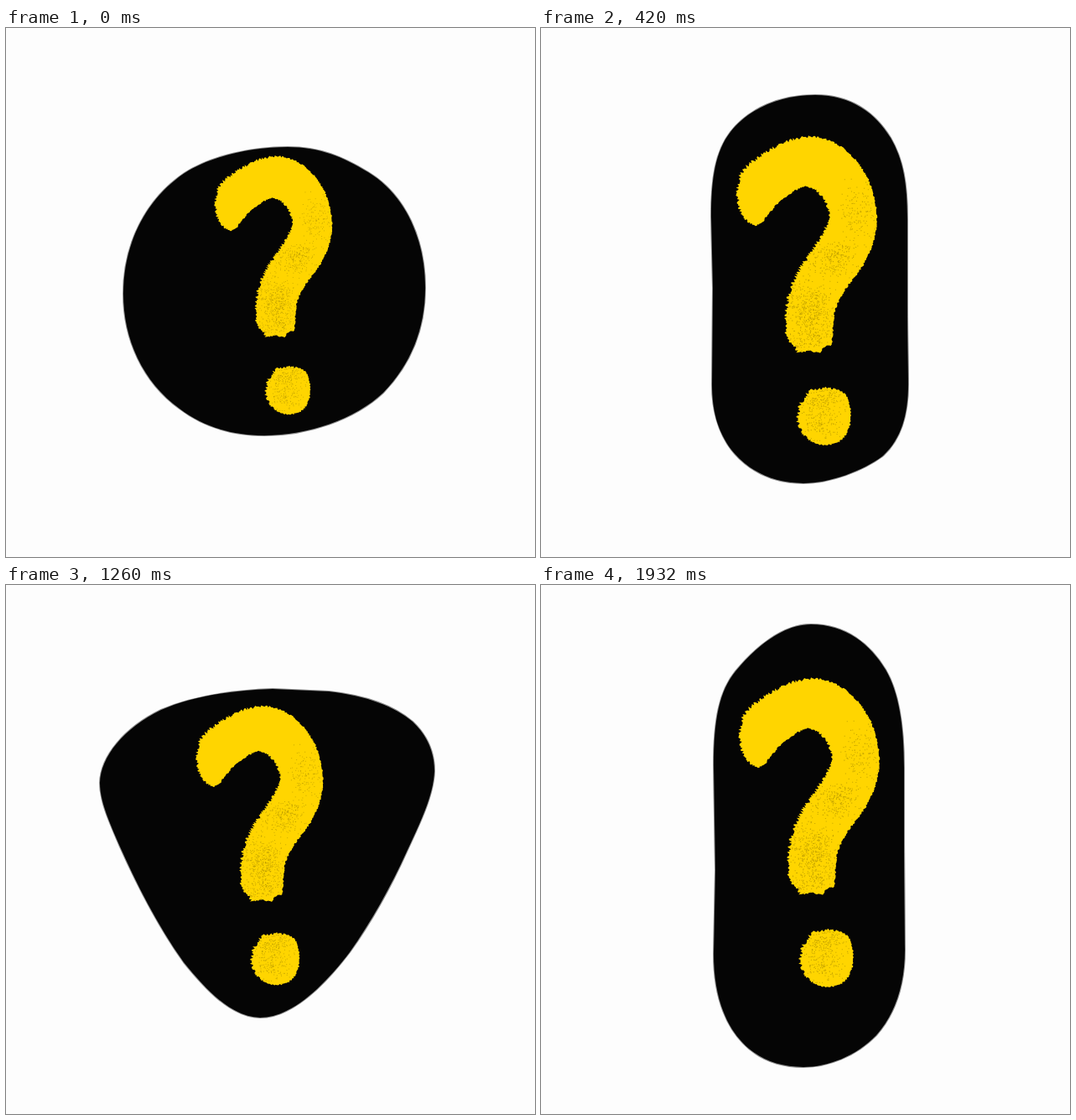
These frames come from a looping animation (631x631 px, 2100 ms). An HTML page:

```html
<!DOCTYPE html>
<html lang="en">
<head>
<meta charset="utf-8">
<title>Question mark shapes</title>
<style>
  html, body { margin: 0; width: 100%; height: 100%; overflow: hidden; background: #fdfdfd; }
  svg { display: block; width: 100%; height: 100%; }
</style>
</head>
<body>
<svg viewBox="0 0 631 631">
  <clipPath id="inside"><path id="clipShape"/></clipPath>
  <path id="blob" fill="#050505" stroke="#050505" stroke-opacity=".45" stroke-width="2"/>
  <g id="mark">
    <path id="paint" fill="#ffd500"/>
    <path id="grain" clip-path="url(#inside)" stroke="#a98d00" stroke-opacity=".65" stroke-width=".9"/>
  </g>
</svg>
<script>
const HOLD = 420;
const get = id => document.getElementById(id);

// Each pose: left, top and scale of the mark, then the backdrop outline.
const poses = [
  { at: [250, 153, 1], d: 'M336 142C375 142 402 154 432 172C478 200 500 254 500 310C500 360 482 402 450 435C416 467 360 486 308 486C270 486 236 476 207 454C163 422 140 371 140 317C140 257 167 204 213 173C246 152 294 142 336 142Z' },
  { at: [234.5, 129.5, 1.195], d: 'M327 80C371 80 399 102 417 131C432 157 437 185 437 228V330C437 370 438 400 438 425C438 460 430 491 407 511C384 528 345 543 313 543C275 543 246 527 227 503C210 480 204 455 204 425L205 310L203 225C203 180 208 147 226 124C248 96 285 80 327 80Z' },
  { at: [240.5, 207.5, 1.045], d: 'M237 88C240 70 275 63 313 63C345 63 375 68 384 77C387 80 388 85 388 92V179L376 182C383 197 402 209 415 226C432 248 438 265 438 290V450C438 485 433 513 417 533C395 560 360 569 315 569C270 569 238 562 219 543C196 520 191 490 191 440V290C192 254 207 231 225 212C235 202 246 193 252 183L237 178Z' },
  { at: [228, 144.5, 1.08], d: 'M318 124L385 127C430 132 464 145 485 163C503 180 511 200 511 222C510 250 495 282 478 318C460 358 435 403 410 438C378 480 340 516 303 516C268 515 238 482 212 450C180 405 155 355 135 310C122 280 112 257 112 236C113 205 140 171 185 149C222 133 265 126 318 124Z' },
  { at: [237.5, 111.5, 1.195], d: 'M322 47C364 47 393 71 411 101C427 128 433 168 433 218V300C433 350 434 400 434 435C434 476 423 511 400 537C376 562 342 575 313 575C274 575 246 558 228 530C213 506 206 475 206 440L208 340L206 215C206 160 213 126 232 103C255 75 288 47 322 47Z' }
];

const hook = 'M269 242C258 240 251 230 250 210C249 197 253 188 262 180C284 163 305 153 325 153C362 156 389 195 389 235C389 251 384 268 373 285C362 300 349 313 346 334L344 361L336 363L332 369L321 367L310 369L306 362L299 354C296 318 303 296 318 276C330 256 341 245 341 229C338 212 327 203 316 203C300 208 283 226 276 237Z';
const dot = 'M336 404C343 404 351 405 355 408C361 413 363 421 363 430C363 443 359 452 352 457C347 460 342 461 336 461C328 460 319 456 315 449C309 442 309 434 311 426C313 416 319 408 327 405Z';

let seed = 7;
const random = () => (seed = seed * 16807 % 2147483647) / 2147483647;
const spread = () => random() + random() + random() - 1.5;

// Frays a clockwise outline; edges facing the upper left get longer bristles.
function fray(d) {
  const path = get('paint');
  path.setAttribute('d', d);
  const points = [];
  for (let s = 0, length = path.getTotalLength(); s < length; s += 1.1) {
    const p = path.getPointAtLength(s);
    const q = path.getPointAtLength(Math.min(s + 0.5, length));
    const size = Math.hypot(q.x - p.x, q.y - p.y) || 1;
    const nx = (q.y - p.y) / size, ny = (p.x - q.x) / size;
    const bristle = 1.6 + 2.4 * Math.max(0, -nx - 0.4 * ny);
    const push = (random() - 0.5) * bristle;
    points.push((p.x + nx * push).toFixed(1) + ' ' + (p.y + ny * push).toFixed(1));
  }
  return 'M' + points.join('L') + 'Z';
}

// Clusters of grain: centre x, centre y, reach x, reach y, count.
const clusters = [
  [322, 325, 22, 28, 420], [345, 275, 24, 18, 240], [370, 230, 20, 32, 150],
  [320, 355, 22, 15, 130], [336, 416, 20, 16, 170], [334, 440, 24, 20, 140]
];
let specks = '';
for (const [x, y, rx, ry, count] of clusters)
  for (let i = 0; i < count; i++)
    specks += `M${(x + spread() * rx).toFixed(1)} ${(y + spread() * ry).toFixed(1)}h.9`;

const outline = fray(hook) + fray(dot);
get('paint').setAttribute('d', outline);
get('clipShape').setAttribute('d', outline);
get('grain').setAttribute('d', specks);

let shown = -1;
function draw() {
  const index = Math.floor(performance.now() / HOLD) % poses.length;
  if (index !== shown) {
    const { d, at: [x, y, scale] } = poses[index];
    get('blob').setAttribute('d', d);
    get('mark').setAttribute('transform', `translate(${x} ${y}) scale(${scale}) translate(-250 -153)`);
    shown = index;
  }
  requestAnimationFrame(draw);
}
draw();
</script>
</body>
</html>
```
